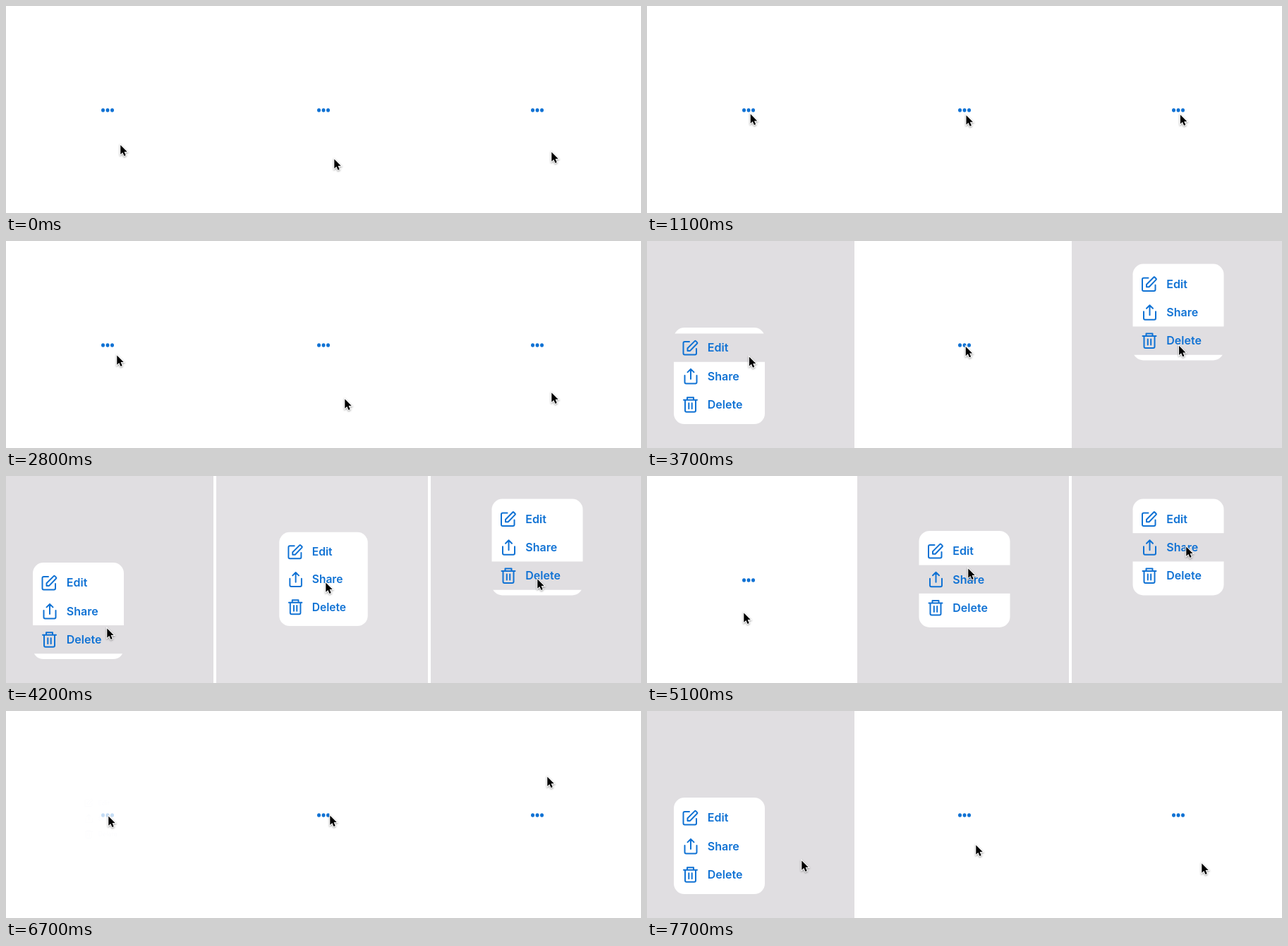
Recreate the animation shown at these times as an HTML page with a canvas. Size 900 px wide and 294 px high, loop 8000 ms.

```html
<!DOCTYPE html>
<html lang="en">
<head>
<meta charset="utf-8">
<title>Context menus</title>
<style>
  html, body { margin: 0; height: 100%; overflow: hidden; background: #fff; }
  canvas { display: block; }
</style>
</head>
<body>
<canvas id="stage" width="900" height="294"></canvas>
<script>
const ctx = document.getElementById('stage').getContext('2d');
const LOOP = 8000, STEP = 100, ROW = 40.3;
const BLUE = '#1072d4', SHADE = '#e0dee1';

const rows = [
  ['Edit', 'M-1.5-8.5H-8a2 2 0 0 0-2 2V8a2 2 0 0 0 2 2H6.5a2 2 0 0 0 2-2V1.5M-4 4.3V.7L6.2-9.5a1 1 0 0 1 1.4 0L9.6-7.5a1 1 0 0 1 0 1.4L-.4 4.3Z'],
  ['Share', 'M-8-1V8.5a2 2 0 0 0 2 2H7a2 2 0 0 0 2-2V-1M.5 4V-10M-4-5.5L.5-10 5-5.5'],
  ['Delete', 'M-9.5-6.5H9.5M-4.5-6.5V-10H4.5V-6.5M-7.5-6.5V8.5a2 2 0 0 0 2 2H5.5a2 2 0 0 0 2-2V-6.5M-2.2-2V6M2.2-2V6'],
].map(([label, icon], i) => ({ label, icon: new Path2D(icon), y: (i - 1) * ROW + 0.3 }));
const arrow = new Path2D('M0 0V13.2L3 10.4 5.2 15.4 7.4 14.4 5.3 9.6H9.4Z');

// Every pointer leaves its stops at these times; DOT means the stop is on the dots.
const stopTimes = [500, 1200, 1800, 2800, 3300, 4200, 5100, 6700, 7500];
const DOT = null;
const panels = [
  {
    left: 0, right: 294, dot: 144, menu: [102.5, 191.6],
    open: [[1190, 2400], [3289, 5000], [6689, LOOP]],
    stops: [[162, 197], DOT, [199, 200], [157, 162], DOT, [143, 216], [137, 194], DOT, [219, 212]],
  },
  {
    left: 298, right: 598, dot: 450, menu: [450, 146.4],
    open: [[1190, 2400], [4096, 5900]],
    stops: [[465, 217], DOT, [448, 141], [480, 224], DOT, [453, 151], [455, 131], [459, 148], [466, 190]],
  },
  {
    left: 602, right: 900, dot: 753, menu: [753, 101],
    open: [[1190, 2400], [3289, 6000]],
    stops: [[773, 207], DOT, [746, 143], [773, 215], DOT, [753, 146], [764, 100], [767, 93], [786, 216]],
  },
];

const clamp = v => Math.max(0, Math.min(1, v));
const mix = (a, b, k) => a + (b - a) * k;

// Rest for the first fifth of each leg, then glide to the next stop.
function pointerAt({ stops, dot }, t) {
  const i = Math.max(0, stopTimes.findLastIndex(time => time <= t));
  const j = Math.min(i + 1, stops.length - 1);
  const [from, to] = [stops[i], stops[j]].map(stop => stop || [dot + 1, 149]);
  const leg = stopTimes[j] - stopTimes[i] || 1;
  const k = clamp(((t - stopTimes[i]) / leg - 0.2) / 0.8), eased = k * k * (3 - 2 * k);
  return [mix(from[0], to[0], eased), mix(from[1], to[1], eased)];
}

const openness = (spans, t) =>
  Math.max(...spans.map(([a, b]) => clamp(Math.min((t - a) / 110, 1 - (t - b) / 100))));

function drawDots(x, alpha) {
  ctx.globalAlpha = alpha;
  ctx.fillStyle = BLUE;
  for (const dx of [-6.5, 0, 6.5]) {
    ctx.beginPath();
    ctx.ellipse(x + dx, 148, 2.5, 2.7, 0, 0, 7);
    ctx.fill();
  }
}

function drawMenu({ menu: [mx, my], dot }, p, hovered) {
  ctx.save();
  ctx.globalAlpha = clamp(1.2 * p * p);
  ctx.translate(mix(dot, mx, p), mix(148, my, p));
  ctx.scale(0.5 + p / 2, 0.5 + p / 2);
  ctx.fillStyle = '#fff';
  ctx.beginPath();
  ctx.roundRect(-64.5, -68.5, 129, 137, 15);
  ctx.fill();
  ctx.font = '600 16px Inter, sans-serif';
  ctx.strokeStyle = BLUE;
  ctx.lineWidth = 2;
  ctx.lineCap = ctx.lineJoin = 'round';
  for (const row of rows) {
    if (row === hovered) {
      ctx.fillStyle = SHADE;
      ctx.fillRect(-66, row.y - ROW / 2, 132, ROW);
    }
    ctx.fillStyle = BLUE;
    ctx.fillText(row.label, -16.7, row.y + 5.8);
    ctx.save();
    ctx.translate(-41, row.y);
    ctx.stroke(row.icon);
    ctx.restore();
  }
  ctx.restore();
}

function drawPointer(x, y) {
  ctx.save();
  ctx.translate(x + 0.3, y + 0.5);
  ctx.lineWidth = 2;
  ctx.strokeStyle = '#fff';
  ctx.shadowColor = 'rgba(0,0,0,.4)';
  ctx.shadowBlur = 2.5;
  ctx.shadowOffsetY = 1;
  ctx.stroke(arrow);
  ctx.shadowColor = 'transparent';
  ctx.fillStyle = '#000';
  ctx.fill(arrow);
  ctx.restore();
}

function drawPanel(panel, t) {
  const p = openness(panel.open, t);
  const [x, y] = pointerAt(panel, t);
  const [mx, my] = panel.menu;
  // rows only react to the pointer after the first round
  const canHover = t > 3000 && p === 1 && Math.abs(x - mx) < 64.5;
  const hovered = canHover && rows.find(row => Math.abs(y - my - row.y) < ROW / 2);

  ctx.globalAlpha = p * p;
  ctx.fillStyle = SHADE;
  ctx.fillRect(panel.left, 0, panel.right - panel.left, 294);
  drawDots(panel.dot, clamp(1 - 7.5 * p));
  if (p > 0) drawMenu(panel, p, hovered);
  ctx.globalAlpha = 1;
  drawPointer(x, y);
}

function frame() {
  const t = Math.floor(performance.now() % LOOP / STEP) * STEP;
  ctx.globalAlpha = 1;
  ctx.fillStyle = '#fff';
  ctx.fillRect(0, 0, 900, 294);
  for (const panel of panels) drawPanel(panel, t);
  requestAnimationFrame(frame);
}
frame();
</script>
</body>
</html>
```
